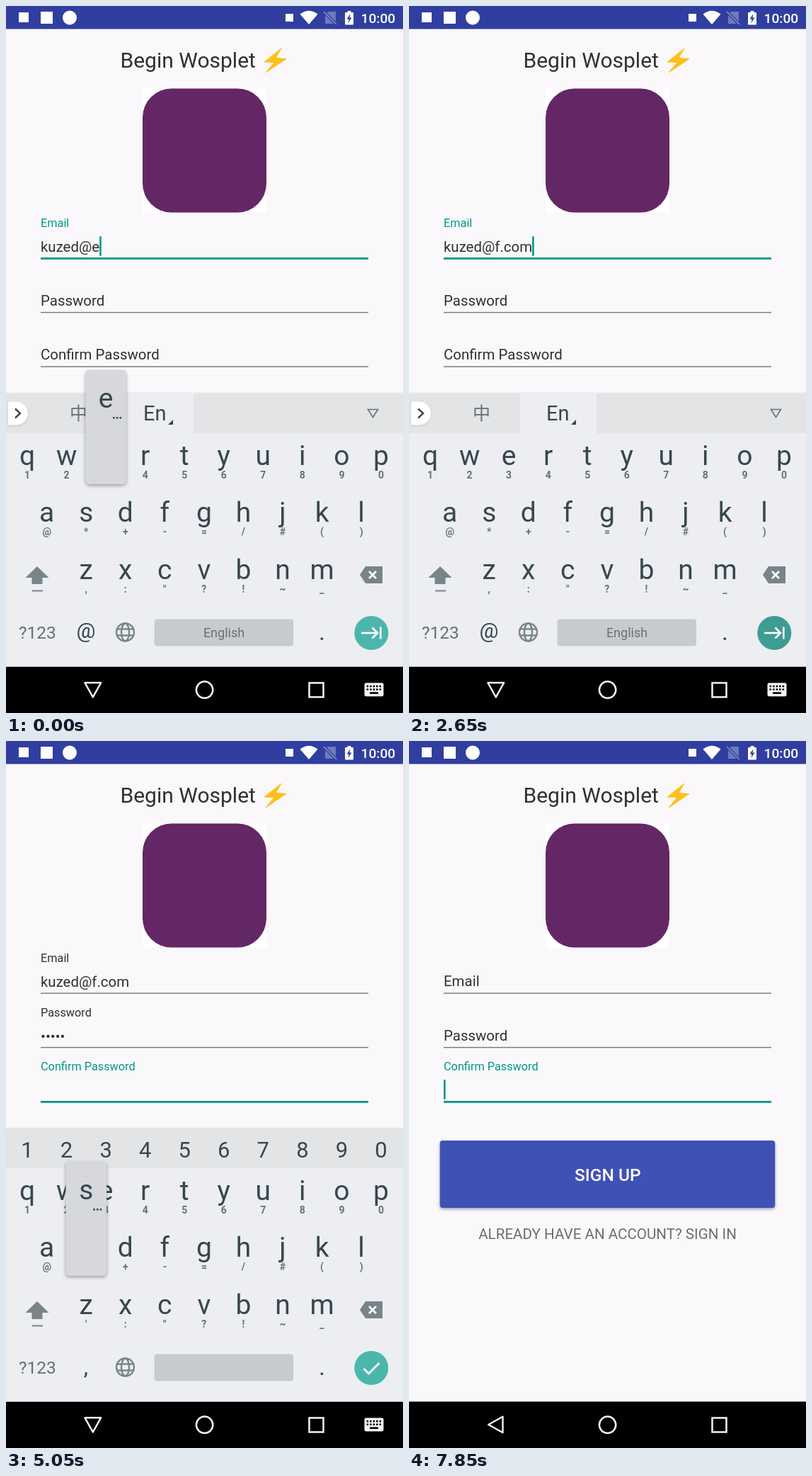
An HTML page with a canvas for the animation above (8 s loop, 561 by 998 pixels).

```html
<!DOCTYPE html>
<html lang="en">
<head>
<meta charset="utf-8">
<title>Sign up</title>
<style>
html, body { margin: 0; width: 100%; height: 100%; overflow: hidden; background: #faf8fb; }
canvas { display: block; width: 561px; height: 998px; }
</style>
</head>
<body>
<canvas id="stage" width="561" height="998"></canvas>
<script>
const W = 561, H = 998, LOOP = 8000, TICK = 50, NAV = 932.5;
const TEAL = '#009688', INK = '#303030', KEY = '#37474f', SOFT = '#657178', INDIGO = '#3f51b5';
const GREY = '#78848a', LIGHT = '#f4f4f4';
const screen = document.getElementById('stage').getContext('2d');
const layer = document.createElement('canvas');
layer.width = W;
layer.height = H;
const board = layer.getContext('2d');
let g = screen;

// Latest value whose start time has passed.
const at = (t, steps) => steps.reduce((v, [start, next]) => t >= start ? next : v, steps[0][1]);
const during = (t, from, to) => t >= from && t < to;
const unit = v => Math.max(0, Math.min(1, v));
const smooth = v => { v = unit(v); return v * v * (3 - 2 * v); };
const mix = (a, b, p) => a + (b - a) * p;
const mask = (n, last = '') => '•'.repeat(n) + last;

function text(str, x, y, size, color = INK, align = 'left', weight = 400) {
  g.font = `${weight} ${size}px Roboto, "Noto Sans CJK SC", sans-serif`;
  g.textAlign = align;
  g.fillStyle = color;
  g.fillText(str, x, y);
  return g.measureText(str).width;
}
function rect(x, y, w, h, color) {
  g.fillStyle = color;
  g.fillRect(x, y, w, h);
}
function round(x, y, w, h, r, color) {
  g.beginPath();
  g.roundRect(x, y, w, h, r);
  g.fillStyle = color;
  g.fill();
}
function disc(x, y, r, color) {
  g.beginPath();
  g.arc(x, y, r, 0, 7);
  g.fillStyle = color;
  g.fill();
}
function trace(points, close) {
  g.beginPath();
  points.forEach(([x, y]) => g.lineTo(x, y));
  if (close) g.closePath();
}
function line(points, color, width, close) {
  trace(points, close);
  g.strokeStyle = color;
  g.lineWidth = width;
  g.stroke();
}
function poly(points, color) {
  trace(points, true);
  g.fillStyle = color;
  g.fill();
}
function shaded(blur, dy, alpha, draw) {
  g.save();
  g.shadowColor = `rgba(0,0,0,${alpha})`;
  g.shadowBlur = blur;
  g.shadowOffsetY = dy;
  draw();
  g.restore();
}

// Keyboard layout
const PITCH = 55.55;
const ROWS = [
  { keys: 'qwertyuiop', hints: '1234567890', x: 30, y: 648 },
  { keys: 'asdfghjkl', hints: '@*+-=/#()', x: 57.7, y: 728 },
  { keys: 'zxcvbnm', hints: ',:"?!~_', x: 113.2, y: 809 }
];
function place(ch) {
  for (const row of ROWS) {
    const i = row.keys.indexOf(ch);
    if (i >= 0) return [row.x + PITCH * i, row.y];
  }
  return [446.5, 890];
}

// Key previews: character, shown from, shown until
const TAPS = [
  ['e', 0, 100], ['f', 1200, 1400], ['.', 1600, 1800], ['c', 1700, 1900],
  ['o', 1950, 2100], ['m', 2150, 2300],
  ['s', 3150, 3300], ['y', 3500, 3700], ['a', 3600, 3750], ['n', 3850, 4000], ['g', 4000, 4150],
  ['s', 5050, 5250], ['y', 5300, 5450], ['a', 5500, 5650], ['n', 5650, 5850], ['g', 5850, 6050]
];
const TO_PASS = 2700, TO_CONFIRM = 4500, HIDE = 6600, CLEAR = 7700;
const USER = 'kuzed@';
const EMAIL = [[0, USER + 'e'], [500, USER], [1250, USER + 'f'], [1650, USER + 'f.'],
  [1800, USER + 'f.c'], [2000, USER + 'f.co'], [2200, USER + 'f.com'], [CLEAR, '']];
const PASS = [[0, ''], [3200, 's'], [3550, mask(1, 'y')], [3650, mask(2, 'a')],
  [3900, mask(3, 'n')], [4050, mask(4, 'g')], [TO_CONFIRM, mask(5)], [CLEAR, '']];
const CONFIRM = [[0, ''], [5150, 's'], [5350, mask(1, 'y')], [5550, mask(2, 'a')],
  [5700, mask(3, 'n')], [5900, mask(4, 'g')], [7450, mask(5)], [CLEAR, '']];
const CURSOR = [[0, true], [1050, false], [1250, true], [4950, false], [5150, true],
  [6300, false], [6950, true], [7450, false], [CLEAR, true]];

function statusBar() {
  rect(0, 0, W, 32.5, '#303f9f');
  rect(18, 9, 14, 14, '#fff');
  rect(49, 8, 17, 17, '#fff');
  disc(90, 16.5, 10, '#fff');
  rect(395, 11, 11, 11, '#fff');
  g.beginPath();
  g.moveTo(428, 26);
  g.lineTo(415.5, 11.5);
  g.quadraticCurveTo(428, 2, 440.5, 11.5);
  g.fillStyle = '#fff';
  g.fill();
  poly([[455, 8], [466, 8], [466, 25], [451, 25], [451, 12]], '#6f7abc');
  line([[449, 8], [467, 26]], '#303f9f', 4);
  line([[449, 8], [467, 26]], '#8791c8', 1.6);
  round(479, 9, 12, 17.5, 1, '#fff');
  rect(482.5, 7, 5, 3, '#fff');
  poly([[486.5, 11], [481.5, 18.5], [484.5, 18.5], [483.5, 24], [488.5, 16.5], [485.5, 16.5]], '#303f9f');
  text('10:00', 501.5, 24, 19.2, '#fff', 'left', 500);
}

function header() {
  text('Begin Wosplet', 161.5, 87, 30);
  const bolt = [[389, 60], [365, 79], [379, 79.5], [367, 94], [396, 74.5], [381, 73.5]];
  poly(bolt, '#fdc01a');
  line(bolt, '#fdc01a', 1, true);
  rect(193, 116.5, 175, 175, '#fff');
  round(193, 116.5, 175, 175, 41, '#632766');
}

function field(label, value, y, focused, up, cursor) {
  const color = focused ? TEAL : INK;
  text(label, 49, mix(y - 10, y - 44, up), mix(20.45, 16.3, up), up > 0.5 ? color : INK);
  const width = value ? text(value, 49, y - 9, 20.45) : 0;
  if (focused) rect(49, y - 1, 463, 2.8, TEAL);
  else rect(49, y - 0.6, 463, 1.4, '#777');
  if (focused && cursor) rect(49 + width, y - 30.8, 2.6, 27.5, TEAL);
}

function form(t) {
  const focus = at(t, [[0, 0], [TO_PASS, 1], [TO_CONFIRM, 2]]);
  const back = smooth((t - CLEAR) / 150);
  const cursor = at(t, CURSOR);
  field('Email', at(t, EMAIL), 356, focus === 0, 1 - back, cursor);
  field('Password', at(t, PASS), 432.5, focus === 1, smooth((t - TO_PASS) / 200) - back, cursor);
  field('Confirm Password', at(t, CONFIRM), 509, focus === 2, smooth((t - TO_CONFIRM) / 150), cursor);
}

function buttons(t) {
  const press = during(t, 7650, 7850);
  shaded(press ? 6 : 4, 2, 0.35, () => round(43.7, 564, 473.5, 95, 4, INDIGO));
  if (press) {
    const p = (t - 7600) / 250;
    g.save();
    g.beginPath();
    g.roundRect(43.7, 564, 473.5, 95, 4);
    g.clip();
    disc(280, 612, 60 + 220 * p, `rgba(255,255,255,${0.2 * (1 - p)})`);
    g.restore();
  }
  text('SIGN UP', 280.8, 621, 24.5, '#fff', 'center', 500);
  text('ALREADY HAVE AN ACCOUNT? SIGN IN', 280.5, 703, 20.6, '#6d6d6f', 'center');
}

function languageBar() {
  rect(157, 547, 108, 56, '#eceef1');
  text('中', 102.5, 584, 25, SOFT, 'center');
  text('En', 194, 585, 29, KEY);
  poly([[236, 584], [236, 591], [229, 591]], KEY);
  shaded(3, 1, 0.15, () => round(3, 558.5, 28, 33, [2, 16.5, 16.5, 2], '#fff'));
  line([[13, 568.5], [20, 575], [13, 581.5]], '#444', 2.4);
  line([[511.5, 569.5], [525.5, 569.5], [518.5, 580.5]], SOFT, 1.6, true);
}

function suggestionBar() {
  ['to', 'the', 'and', 'for', 'in', 'is'].forEach((word, i) => {
    text(word, 42 + 82.3 * i, 584, 23, SOFT, 'center');
    rect(i < 5 ? 83.5 + 82.3 * i : 497, 558, 1.3, 35, '#c6c9cb');
  });
  line([[521, 572], [528, 579], [535, 572]], GREY, 2.6);
}

function numberBar() {
  [...'1234567890'].forEach((d, i) => text(d, 30 + PITCH * i, 587.5, 31, KEY, 'center'));
}

function letters(secret) {
  for (const row of ROWS) {
    [...row.keys].forEach((ch, i) => {
      const x = row.x + PITCH * i;
      const hint = secret && ch === 'z' ? "'" : row.hints[i];
      text(ch, x, row.y, 39, KEY, 'center');
      text(hint, x, row.y + 19, 14, SOFT, 'center', 700);
    });
  }
}

function globe(x, y) {
  g.strokeStyle = GREY;
  g.lineWidth = 2.4;
  for (const rx of [12.5, 5.5]) {
    g.beginPath();
    g.ellipse(x, y, rx, 12.5, 0, 0, 7);
    g.stroke();
  }
  for (const dy of [-4.5, 4.5]) line([[x - 11.5, y + dy], [x + 11.5, y + dy]], GREY, 2.4);
}

function functionKeys(t, secret) {
  if (during(t, 450, 550)) rect(478, 770, 76, 66, '#d8dbde');
  poly([[44, 791], [60.5, 807], [51.5, 807], [51.5, 816], [36.5, 816], [36.5, 807], [27.5, 807]], GREY);
  rect(37, 824.5, 15, 2, GREY);
  poly([[500, 803], [508, 791], [532, 791], [532, 815], [508, 815]], GREY);
  line([[513, 798], [523, 808]], '#fff', 2.6);
  line([[523, 798], [513, 808]], '#fff', 2.6);

  text('?123', 18, 893, 24.5, SOFT);
  text(secret ? ',' : '@', 113, secret ? 894 : 892, secret ? 32 : 30, KEY, 'center');
  globe(168.5, 884);
  round(209.5, 865.5, 196.5, 38, 4, '#c8cbce');
  if (!secret) text('English', 308, 891, 18, SOFT, 'center');
  text('.', 446.5, 895, 34, KEY, 'center');
}

function enterKey(t) {
  const pressed = during(t, 2650, 2750) || during(t, 4450, 4550) || during(t, 6450, 6550);
  disc(516.3, 885, 24, pressed ? '#3f9c93' : '#4db6ac');
  if (t >= 4550) {
    line([[505.5, 886], [512.5, 893], [527.5, 878]], '#fff', 2.8);
  } else {
    line([[502, 885], [525, 885]], '#fff', 2.6);
    line([[517.5, 877.5], [525, 885], [517.5, 892.5]], '#fff', 2.6);
    rect(528, 876.5, 2.6, 17, '#fff');
  }
}

function preview(ch) {
  const [x, keyY] = place(ch), y = keyY - 81;
  shaded(5, 2, 0.35, () => round(x - 28.7, y - 53, 57.5, 161, 5, '#d6d8db'));
  text(ch, x, y, 39, KEY, 'center');
  for (let i = 0; i < 3; i++) rect(x + 10 + 4.7 * i, y + 13, 2.6, 2.6, KEY);
}

function keyboard(t) {
  const secret = t >= 2750;
  g = board;
  g.clearRect(0, 0, W, H);
  rect(0, 545, W, 2, 'rgba(0,0,0,.04)');
  rect(0, 547, W, NAV - 547, '#eceef1');
  rect(0, 547, W, 56, '#e3e4e6');
  if (secret) numberBar();
  else if (during(t, 1650, 1800)) suggestionBar();
  else languageBar();
  letters(secret);
  functionKeys(t, secret);
  enterKey(t);
  for (const [ch, from, to] of TAPS) if (during(t, from, to)) preview(ch);
  g = screen;

  const gone = unit((t - HIDE) / 170) ** 5;
  g.save();
  g.globalAlpha = 1 - gone;
  g.translate(0, 76 * gone);
  g.drawImage(layer, 0, 0);
  // The enter key is a raised layer that fades on its own.
  if (gone > 0) enterKey(t);
  g.restore();
}

function navIcons(t) {
  g.save();
  g.lineJoin = 'round';
  g.translate(122.8, 965);
  g.rotate(smooth((t - HIDE) / 150) * Math.PI / 2);
  line([[-11.3, -9.7], [11.3, -9.7], [0, 10.6]], LIGHT, 2.4, true);
  g.restore();
  g.strokeStyle = LIGHT;
  g.lineWidth = 2.5;
  g.beginPath();
  g.arc(280.6, 965.3, 11.7, 0, 7);
  g.stroke();
  g.strokeRect(428.5, 955.5, 20, 20);
  if (t >= HIDE) return;
  round(506.5, 955.5, 27, 19, 2.5, LIGHT);
  for (let i = 0; i < 5; i++) {
    for (const y of [959, 963.5]) rect(509.6 + 4.5 * i, y, 2.5, 2.5, '#000');
  }
  rect(514, 968.5, 12, 2.6, '#000');
}

function draw(t) {
  rect(0, 0, W, H, '#faf8fb');
  statusBar();
  header();
  form(t);
  if (t >= HIDE) buttons(t);
  rect(0, NAV, W, H - NAV, '#000');
  if (t < HIDE + 170) keyboard(t);
  navIcons(t);
}

const start = performance.now();
function frame() {
  const t = (performance.now() - start) % LOOP;
  draw(Math.floor(t / TICK) * TICK);
  requestAnimationFrame(frame);
}
frame();
</script>
</body>
</html>
```
